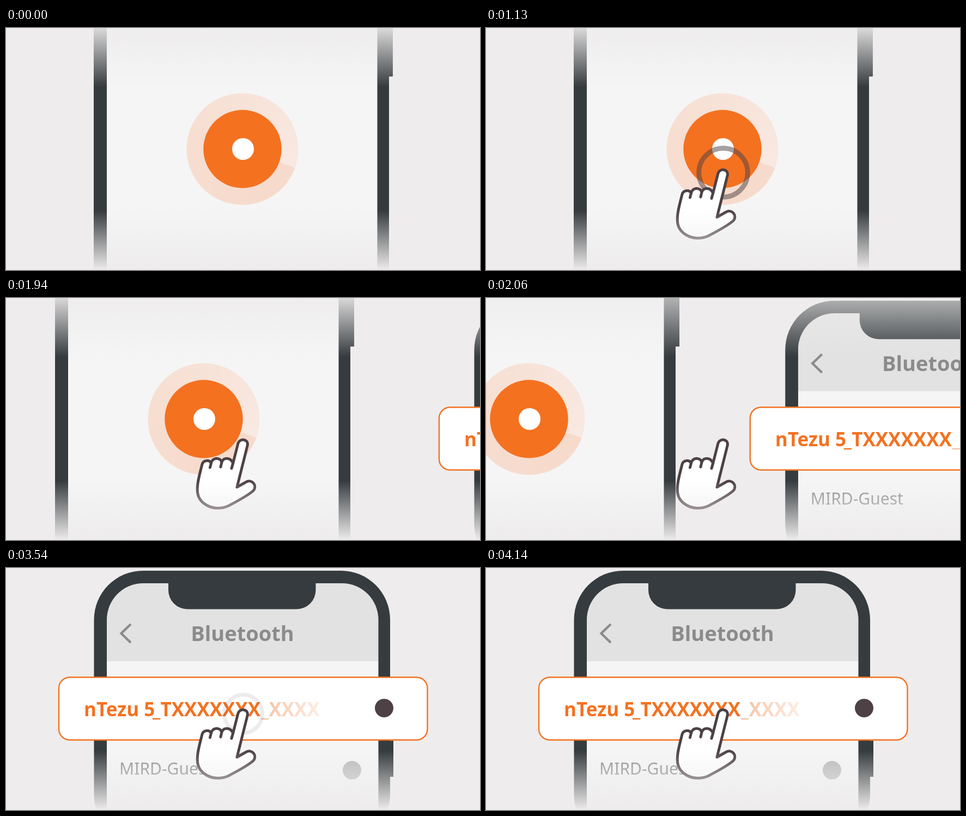
An HTML page with a canvas for the animation above (5.77 s loop, 870 px wide and 444 px high).

```html
<!DOCTYPE html>
<html lang="en">
<head>
<meta charset="utf-8">
<title>Pairing</title>
<style>
  html, body { margin: 0; width: 100%; height: 100%; overflow: hidden; background: #eeecec; }
  canvas { display: block; }
</style>
</head>
<body>
<canvas id="stage" width="870" height="444"></canvas>
<script>
const W = 870, H = 444, LOOP = 5770, TICK = 30;
const BG = '#eeecec', DARK = '#353b3e', INK = '#4d4145', ORANGE = '#f47120', PAPER = '#f5f5f5';
const FONT = '"Noto Sans", "Open Sans", sans-serif';
const ctx = document.getElementById('stage').getContext('2d');

function rect(x, y, w, h, color) {
  ctx.fillStyle = color;
  ctx.fillRect(x, y, w, h);
}

function disc(x, y, r, color) {
  ctx.fillStyle = color;
  ctx.beginPath();
  ctx.arc(x, y, r, 0, Math.PI * 2);
  ctx.fill();
}

function rounded(x, y, w, h, radii, color) {
  ctx.fillStyle = color;
  ctx.beginPath();
  ctx.roundRect(x, y, w, h, radii);
  ctx.fill();
}

function label(str, x, y, font, color, align = 'left') {
  ctx.font = font + ' ' + FONT;
  ctx.textAlign = align;
  ctx.fillStyle = color;
  ctx.fillText(str, x, y);
}

// Blends the stage into the background from y0 (clear) to y1 (covered).
function veil(y0, y1, alpha) {
  const g = ctx.createLinearGradient(0, y0, 0, y1);
  g.addColorStop(0, 'rgba(238,236,236,0)');
  g.addColorStop(1, `rgba(238,236,236,${alpha})`);
  rect(0, Math.min(y0, y1), W, Math.abs(y1 - y0), g);
}

function buttonScene() {
  rect(161, 0, 542, H, DARK);
  rect(703, 0, 7, 89, DARK);
  rect(185, 0, 496.5, H, PAPER);
  const halo = ctx.createConicGradient(0.345, 434, 222);
  halo.addColorStop(0, '#f6dacb');
  halo.addColorStop(0.5, '#f7ded1');
  halo.addColorStop(1, '#f8e9e2');
  disc(434, 222, 102.5, halo);
  disc(434, 222, 71.7, ORANGE);
  disc(435, 222, 20, '#fff');
}

function listScene() {
  rect(704, 317, 7, 66, DARK);
  rounded(161.5, 5, 543.5, 500, 90, DARK);
  ctx.save();
  ctx.beginPath();
  ctx.roundRect(185, 28, 498.5, 500, 67);
  ctx.clip();
  rect(185, 28, 499, 143, '#e2e2e2');
  rect(185, 171, 499, 300, PAPER);
  ctx.restore();
  rounded(298, 20, 270.5, 55.5, [0, 0, 35, 35], DARK);

  ctx.strokeStyle = '#8b8b8b';
  ctx.lineWidth = 4.5;
  ctx.stroke(new Path2D('M229 103L211.5 120L229 137'));
  label('Bluetooth', 434, 134, '600 38px', '#8b8b8b', 'center');

  label('MIRD-Guest', 208, 379, '30px', '#8d8d8d');
  disc(635, 371, 17, '#bababa');

  rounded(97, 200.5, 676.5, 115, 20, '#fff');
  ctx.strokeStyle = ORANGE;
  ctx.lineWidth = 2.4;
  ctx.stroke();
  const fade = ctx.createLinearGradient(468, 0, 578, 0);
  fade.addColorStop(0, '#f4c0a2');
  fade.addColorStop(1, '#feeee5');
  label('nTezu 5', 143, 272, '600 35px', ORANGE);
  label('_TXXXXXXX', 269, 272, '600 35px', ORANGE);
  label('_XXXX', 468, 272, '600 35px', fade);
  disc(694, 257, 17, INK);
}

// The hand is drawn once so that it can fade as a whole.
const hand = document.createElement('canvas');
hand.width = W;
hand.height = H;
{
  const h = hand.getContext('2d');
  const body = new Path2D('M416.7 303L426 266.5C429 257 445 258 443.3 270L424 347L440 338' +
    'C451 331 462 344 454 353.5C449 358 430 370 408 381.5C394 388 378 386 368 380' +
    'C354 372 350 361 351.5 345C352.5 332 357 318 360 305C363 296.5 374 297 376.5 303' +
    'C379 292 393 292 396 301C399 292 412 292 416.7 303Z');
  const folds = new Path2D('M376.5 303L374.5 311M396 301L394 310M416.7 303L414 312.5');
  h.lineCap = h.lineJoin = 'round';
  h.lineWidth = 5;
  h.strokeStyle = INK;
  h.fillStyle = '#fff';
  h.fill(body);
  h.stroke(body);
  h.stroke(folds);
}

function ripple(p) {
  const alpha = 1 - Math.abs(2 * p - 1);
  if (p <= 0 || alpha <= 0) return;
  const outer = 35.8 * (1 + 1.5 * p), width = outer * 0.18;
  ctx.globalAlpha = alpha;
  ctx.strokeStyle = INK;
  ctx.lineWidth = width;
  ctx.beginPath();
  ctx.arc(435.5, 268 - 10.7 * p, outer - width / 2, 0, Math.PI * 2);
  ctx.stroke();
  ctx.globalAlpha = 1;
}

function shifted(dx, paint) {
  ctx.save();
  ctx.translate(dx, 0);
  paint();
  ctx.restore();
}

// Progress 0..1 in n ticks, the first one landing at start.
function progress(t, start, n) {
  const k = Math.floor((t - start) / TICK) + 1;
  return Math.max(0, Math.min(n, k)) / n;
}

function render(t) {
  const rise = progress(t, 560, 15);
  const slide = progress(t, 1940, 10);
  rect(0, 0, W, H, BG);
  if (slide < 1) shifted(-710 * slide, buttonScene);
  if (slide > 0) shifted(775.5 * (1 - slide), listScene);
  if (slide < 1) veil(108, 0, 0.9 * (1 - slide * slide));
  ripple(progress(t, 1010, 20));
  ripple(progress(t, 3540, 20));
  ctx.globalAlpha = rise;
  ctx.drawImage(hand, 0, 65 * (1 - rise));
  ctx.globalAlpha = 1;
  veil(335, H, 1);
}

const begin = performance.now();
function loop() {
  render((performance.now() - begin) % LOOP);
  requestAnimationFrame(loop);
}
loop();
</script>
</body>
</html>
```
